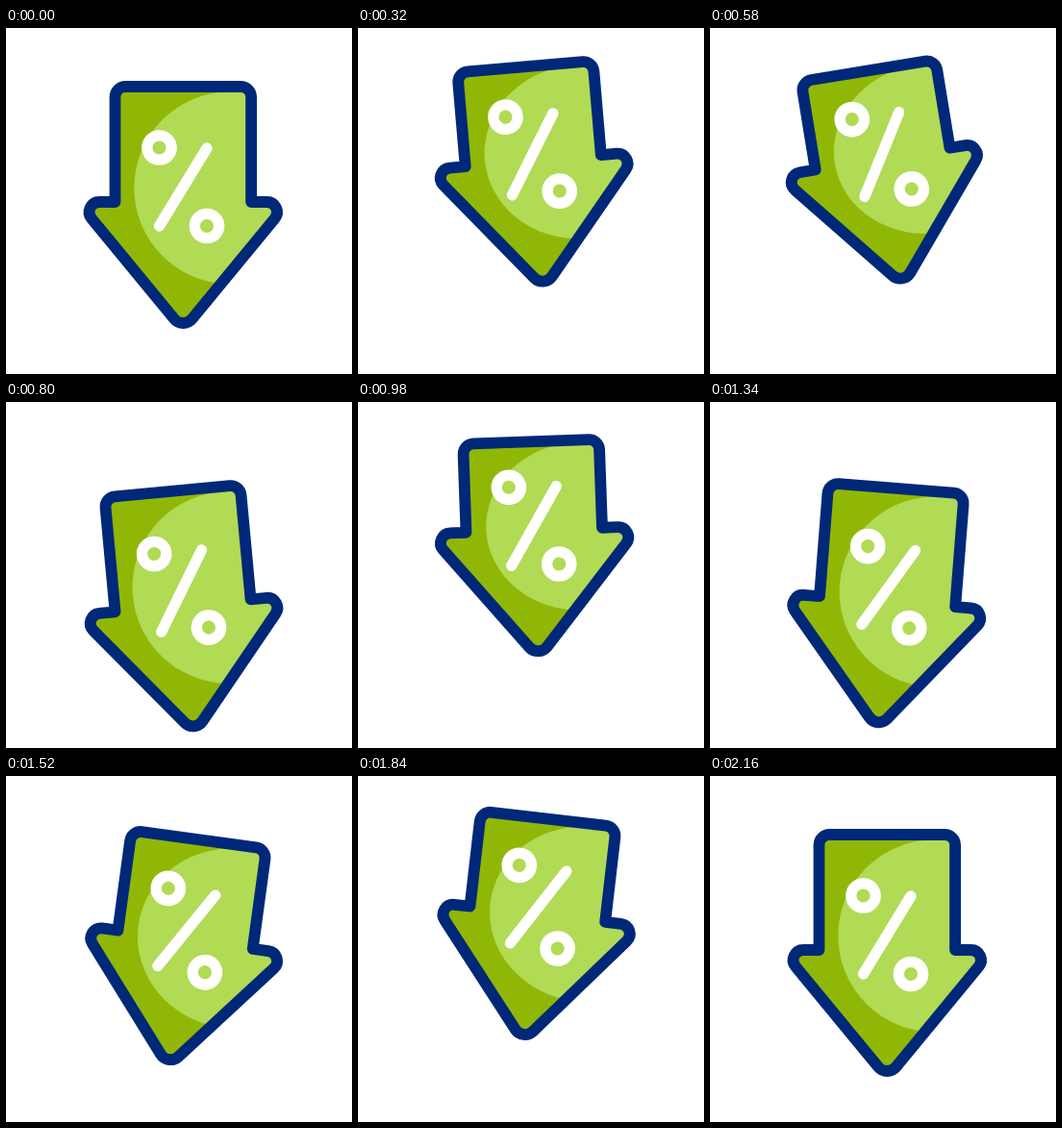
Recreate the animation shown at these times as an HTML page. Size 360x360 px, loop 2400 ms.

```html
<!DOCTYPE html>
<html lang="en">
<head>
<meta charset="utf-8">
<title>Discount arrow</title>
<style>
  html, body { margin: 0; width: 100%; height: 100%; overflow: hidden; background: #fff; }
  svg { display: block; width: 100vw; height: 100vh; }
</style>
</head>
<body>
<svg viewBox="0 0 360 360">
  <defs>
    <clipPath id="inside"><path class="arrow"/></clipPath>
  </defs>
  <g id="all">
    <path class="arrow" fill="#91b706"/>
    <ellipse id="shine" cx="233.3" fill="#b1da55" clip-path="url(#inside)"/>
    <path class="arrow" fill="none" stroke="#002878" stroke-width="11.8" stroke-linejoin="round"/>
    <g id="percent" fill="none" stroke="#fff" stroke-width="11.3" stroke-linecap="round">
      <circle cx="159.5" cy="124.5" r="12.7"/>
      <circle cx="209" cy="206" r="12.7"/>
      <path d="M209 125L159.5 206"/>
    </g>
  </g>
</svg>
<script>
const LOOP = 2400, STEP = 20;
const CX = 184.3, CY = 183;

// [time in ms, value]
const lift = [[110, 0], [480, -35], [780, 32], [1072, -35], [1386, 32], [1686, -35], [1990, 0]];
const squeeze = [[110, 0], [480, 36], [780, 0], [1072, 36], [1386, 0], [1686, 36], [2020, 0]];
const tilt = [[110, 0], [540, -10], [1660, 10.3], [2160, 0]];

const linear = p => p;
const sine = p => (1 - Math.cos(Math.PI * p)) / 2;

function at(keys, t, ease) {
  if (t <= keys[0][0]) return keys[0][1];
  for (let i = 1; i < keys.length; i++) {
    const [t0, a] = keys[i - 1], [t1, b] = keys[i];
    if (t < t1) return a + (b - a) * ease((t - t0) / (t1 - t0));
  }
  return keys[keys.length - 1][1];
}

// The head slides up by s towards the fixed tail.
function arrowPath(s) {
  const L = x => CX - x, R = x => CX + x;
  const shoulder = 181 - s, wing = 198.2 - s, tip = 302.7 - s;
  return `M${L(60)} 61H${R(60)}A10.8 10.8 0 0 1 ${R(70.8)} 71.8V${shoulder}H${R(87.3)}` +
    `A10.5 10.5 0 0 1 ${R(95.3)} ${wing}L${R(9.2)} ${tip}` +
    `A12 12 0 0 1 ${L(9.2)} ${tip}L${L(95.3)} ${wing}` +
    `A10.5 10.5 0 0 1 ${L(87.3)} ${shoulder}H${L(70.8)}V71.8A10.8 10.8 0 0 1 ${L(60)} 61Z`;
}

const all = document.getElementById('all');
const shine = document.getElementById('shine');
const percent = document.getElementById('percent');
const arrows = document.querySelectorAll('.arrow');

function draw(t) {
  const s = at(squeeze, t, sine);
  const d = arrowPath(s);
  arrows.forEach(a => a.setAttribute('d', d));
  shine.setAttribute('cy', 166.3 - 0.56 * s);
  shine.setAttribute('rx', 100 - 0.04 * s);
  shine.setAttribute('ry', 100 - 0.44 * s);
  percent.setAttribute('transform', `translate(0 ${-0.6 * s})`);
  all.setAttribute('transform',
    `translate(0 ${at(lift, t, sine)}) rotate(${at(tilt, t, linear)} ${CX} ${CY})`);
}

const start = performance.now();
function tick() {
  const t = (performance.now() - start) % LOOP;
  draw(Math.floor(t / STEP) * STEP);
  requestAnimationFrame(tick);
}
draw(0);
requestAnimationFrame(tick);
</script>
</body>
</html>
```
